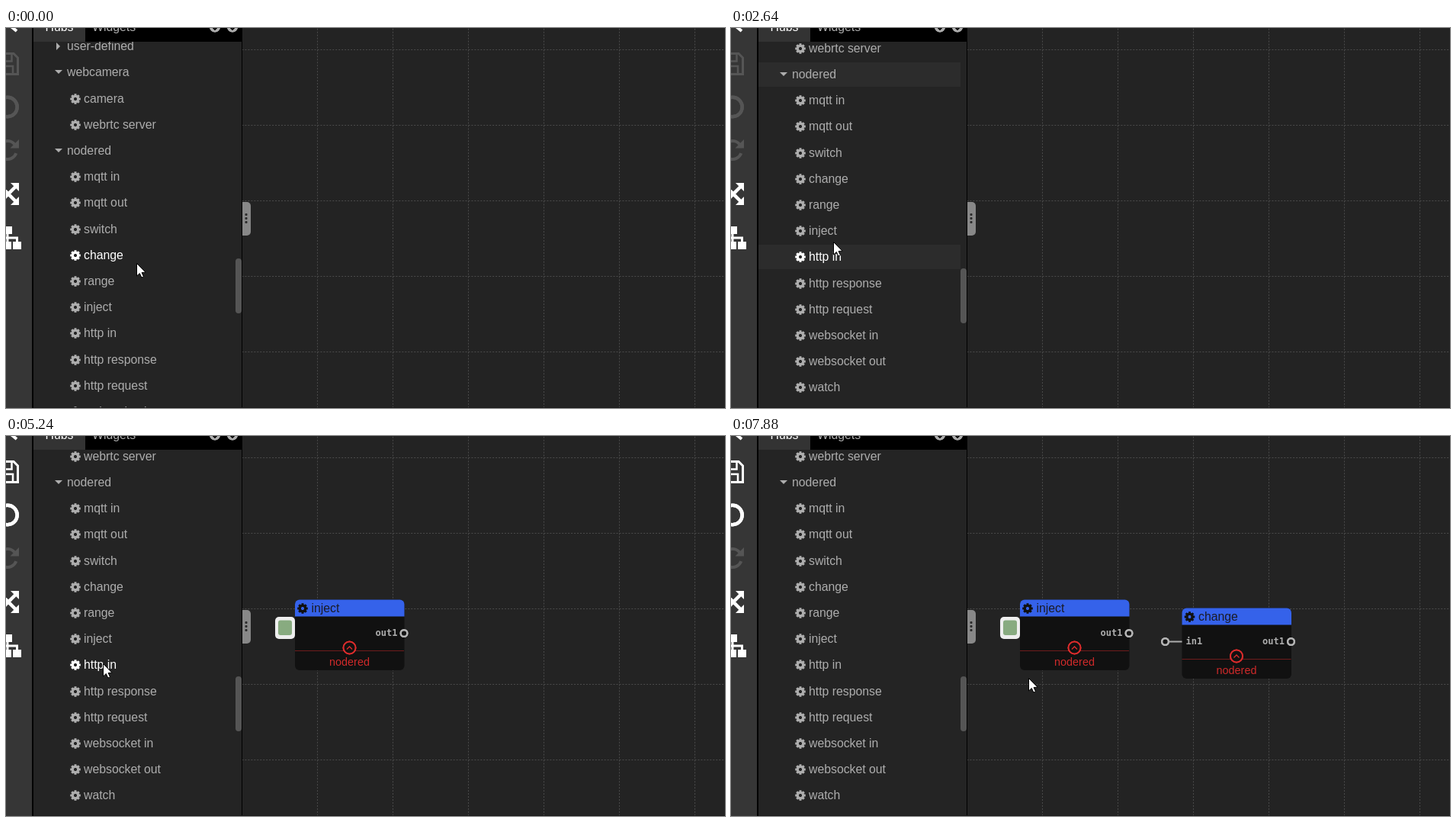
Recreate the animation shown at these times as an HTML page with a canvas. Size 943 by 498 pixels, loop 8000 ms.

```html
<!DOCTYPE html>
<html lang="en">
<head>
<meta charset="utf-8">
<title>Flow editor</title>
<style>
  html, body { margin: 0; width: 100%; height: 100%; overflow: hidden; background: #232323; }
  canvas { display: block; }
</style>
</head>
<body>
<canvas id="stage" width="943" height="498"></canvas>
<script>
const W = 943, H = 498, LOOP = 8000, TICK = 131;
const c = document.getElementById('stage').getContext('2d');
const SANS = '"Liberation Sans", Arial, sans-serif';
const MONO = '"DejaVu Sans Mono", monospace';
const GREY = '#adadad', DIM = '#555', RED = '#dc2c2c';
const ROW = 34.2, FIRST_ROW = 24.15, CELL = 99;
const INJECT_DRAG = 3280, INJECT_DROP = 3680, INJECT_READY = 5240;
const CHANGE_DRAG = 5870, CHANGE_DROP = 7350, CHANGE_READY = 7740;

const groups = ['user-defined', 'webcamera', 'nodered'];
const items = ['user-defined', 'webcamera', 'camera', 'webrtc server', 'nodered',
  'mqtt in', 'mqtt out', 'switch', 'change', 'range', 'inject', 'http in',
  'http response', 'http request', 'websocket in', 'websocket out', 'watch'];

// pointer moves: start, end, destination
const moves = [
  [0, 540, 160, 180], [540, 1120, 143, 342], [1140, 1530, 153, 348],
  [1660, 2360, 140, 314], [2500, 2640, 134, 280], [2640, 2910, 134, 272],
  [3150, INJECT_DROP, 380, 217], [4080, INJECT_READY, 127, 298],
  [5240, 5480, 130, 204], [5740, 6820, 560, 268], [6820, 7090, 608, 252],
  [7090, CHANGE_DROP, 593, 228], [CHANGE_DROP, 7880, 390, 317]];

// progress from 0 to 1, advancing once per screen update
function stepped(t, start, end) {
  const n = Math.max(1, Math.round((end - start) / TICK));
  const k = Math.floor((t - start) / (end - start) * n) / n;
  return Math.max(0, Math.min(1, k));
}

function pointerAt(t) {
  let x = 171, y = 308;
  for (const [start, end, toX, toY] of moves) {
    const k = stepped(t, start, end);
    x += (toX - x) * k;
    y += (toY - y) * k;
  }
  return [x, y];
}

function scrollAt(t) {
  const k = stepped(t, 1660, 2080);
  return 100 * k * k * (3 - 2 * k);
}

const rowY = (i, scroll) => FIRST_ROW + ROW * i - scroll;

function hovered(t) {
  if ((t >= INJECT_DRAG && t < INJECT_READY) || t >= CHANGE_DRAG) return -1;
  const seen = Math.max(0, t - 20);
  const y = pointerAt(seen)[1];
  return items.findIndex((_, i) => Math.abs(y - rowY(i, scrollAt(seen))) < 16);
}

function rect(x, y, w, h, fill) {
  c.fillStyle = fill;
  c.fillRect(x, y, w, h);
}

function round(x, y, w, h, r, fill) {
  c.beginPath();
  c.roundRect(x, y, w, h, r);
  c.fillStyle = fill;
  c.fill();
}

function poly(points, fill) {
  c.beginPath();
  points.forEach(([x, y]) => c.lineTo(x, y));
  c.closePath();
  c.fillStyle = fill;
  c.fill();
}

function stroke(color, width) {
  c.strokeStyle = color;
  c.lineWidth = width;
  c.stroke();
}

function line(points, color, width = 1) {
  c.beginPath();
  points.forEach(([x, y]) => c.lineTo(x, y));
  stroke(color, width);
}

function arc(x, y, r, from, to, color, width) {
  c.beginPath();
  c.arc(x, y, r, from, to);
  stroke(color, width);
}

function ring(x, y, r, color, width, fill = 'transparent') {
  arc(x, y, r, 0, Math.PI * 2, color, width);
  c.fillStyle = fill;
  c.fill();
  stroke(color, width);
}

function text(s, x, y, color, align = 'left', font = '15.8px ' + SANS) {
  c.font = font;
  c.textAlign = align;
  c.fillStyle = color;
  c.fillText(s, x, y);
}

function gear(x, y, color) {
  c.save();
  c.translate(x, y);
  ring(0, 0, 3.7, color, 3);
  c.fillStyle = color;
  for (let i = 0; i < 8; i++) {
    c.rotate(Math.PI / 4);
    c.fillRect(-1.5, -6.8, 3, 2.6);
  }
  c.restore();
}

function drawGrid() {
  const left = 309.5, top = 28.5 - CELL;
  c.setLineDash([CELL / 50, CELL / 50]);
  for (let x = left + CELL; x < W; x += CELL) line([[x, top], [x, H]], '#4b4b4b');
  for (let y = top + CELL; y < H; y += CELL) line([[left, y], [W, y]], '#4b4b4b');
  c.setLineDash([]);
}

function drawToolbar(edited) {
  const on = edited ? '#fff' : DIM;
  rect(0, 0, 34, H, '#363636');
  rect(34, 0, 2, H, '#000');
  line([[3, -5], [14, 4]], '#fff', 4);

  // save
  line([[-4, 33.5], [10, 33.5], [15.5, 39], [15.5, 60.5], [-4, 60.5]], on, 3);
  line([[-4, 43.5], [7.5, 43.5], [7.5, 34]], on, 2.5);
  line([[-4, 50], [9, 50], [9, 60]], on, 2.5);

  ring(2, 103.5, 12.7, on, 4.5);

  // redo
  arc(2, 160, 12, 0.35, 2, DIM, 4);
  arc(2, 160, 12, -1.8, -0.6, DIM, 4);
  poly([[17, 146], [17, 157.5], [5.5, 157.5]], DIM);

  // expand, mirrored about its middle
  for (const s of [-1, 1]) {
    line([[-6, 217.5 - 9 * s], [13, 217.5 + 10 * s]], '#fff', 4.5);
    poly([[6, 217.5 + 14.5 * s], [17, 217.5 + 14.5 * s], [17, 217.5 + 3.5 * s]], '#fff');
  }

  // tree
  rect(-4, 260, 12, 10, '#fff');
  rect(0.5, 269, 3, 12, '#fff');
  rect(-4, 273.5, 20, 3, '#fff');
  rect(13, 274, 3, 7, '#fff');
  rect(-4, 280, 11, 10, '#fff');
  rect(9, 280, 11, 10, '#fff');
}

function drawRow(name, y, open, lit) {
  const color = lit ? '#fff' : GREY;
  if (groups.includes(name)) {
    if (open) poly([[64, y - 3], [74, y - 3], [69, y + 2]], GREY);
    else poly([[66, y - 5], [71, y], [66, y + 5]], GREY);
    text(name, 80, y + 5, GREY);
  } else {
    gear(91, y, color);
    text(name, 102, y + 5, color);
  }
}

function drawPanel(t) {
  const scroll = scrollAt(t), hover = hovered(t);
  rect(36, 0, 273, H, '#242424');
  c.save();
  c.beginPath();
  c.rect(36, 18, 273, H - 18);
  c.clip();
  items.forEach((name, i) => {
    const y = Math.round(rowY(i, scroll)), lit = i === hover;
    const held = name === 'nodered' && t >= 2080 && t < INJECT_READY;
    if (held || (lit && t > 1000 && t < INJECT_DRAG)) rect(36, y - 16, 265, 32, '#2c2c2c');
    drawRow(name, y, i > 0, lit);
  });
  c.restore();
  round(301, 302 + scroll * 0.13, 8, 72, 4, DIM);

  rect(36, 0, 68, 18, '#333');
  rect(104, 0, 206, 18, '#000');
  text('Hubs', 51.5, 4, '#fff');
  text('Widgets', 113, 4, GREY);
  for (const x of [274, 297]) {
    ring(x, -1.5, 3.5, GREY, 7);
    line([[x - 3, -1], [x, 2], [x + 3, -1]], '#000', 1.8);
  }
  rect(309, 0, 1, H, '#000');
}

function drawHandle() {
  round(310, 228, 11, 44, [0, 5, 5, 0], '#888');
  for (let y = 243; y < 256; y += 5) round(313.5, y, 3, 3, 1, '#2b2b2b');
}

function port(x, y) {
  ring(x, y, 4.3, '#b5b5b5', 2.4, '#151515');
}

function drawNode(name, x, y, hasInput) {
  const label = 'bold 12px ' + MONO, mid = x + 71.5, portY = y + 44;
  if (!hasInput) {
    round(x - 26, y + 22.5, 26, 29, 5, '#eee');
    round(x - 22, y + 27, 18, 19.5, 3, '#88ab80');
  }
  round(x, y, 143.5, 92.5, 6, '#111');
  round(x, y, 143.5, 22, [6, 6, 0, 0], '#3562ea');
  gear(x + 10, y + 11.5, '#111');
  text(name, x + 21.5, y + 16.5, '#1b1b26');
  if (hasInput) {
    line([[x - 18, portY], [x, portY]], GREY, 2);
    port(x - 22, portY);
    text('in1', x + 5, y + 47.5, GREY, 'left', label);
  }
  text('out1', x + 134.5, y + 47.5, GREY, 'right', label);
  port(x + 143, portY);
  line([[x, y + 67], [x + 143, y + 67]], '#6e1c1c');
  ring(mid, y + 63, 8, RED, 2, '#111');
  line([[mid - 3.5, y + 65], [mid, y + 61.5], [mid + 3.5, y + 65]], RED, 1.3);
  text('nodered', mid, y + 86.5, '#cf2a2a', 'center', '14.4px ' + SANS);
}

// outline that follows the pointer until it is dropped
function drawGhost(name, t, drop, grip) {
  const [px, py] = pointerAt(Math.min(t, drop));
  const x = Math.round(px) - 1, y = Math.round(py) + (t < drop ? grip : -4);
  if (x < 290) return;
  c.beginPath();
  c.roundRect(x + 0.5, y + 0.5, 142, 65, 6);
  stroke(GREY, 1);
  text(name, x + 71.5, y + 17, GREY, 'center');
}

function drawPointer([x, y]) {
  c.save();
  c.translate(Math.round(x) + 0.5, Math.round(y) + 0.5);
  poly([[0, 0], [0, 16.5], [3.8, 13], [6.3, 18.5], [9, 17.4], [6.6, 12], [11.5, 11.7]], '#fff');
  stroke('#000', 1);
  c.restore();
}

function draw(t) {
  rect(0, 0, W, H, '#232323');
  drawGrid();
  drawToolbar(t >= INJECT_READY);
  drawPanel(t);
  drawHandle();
  rect(36, 497, W - 36, 1, '#1a1a1a');
  if (t >= INJECT_READY) drawNode('inject', 379, 214.5, false);
  else if (t >= INJECT_DRAG) drawGhost('inject', t, INJECT_DROP, -4);
  if (t >= CHANGE_READY) drawNode('change', 591.5, 225.5, true);
  else if (t >= CHANGE_DRAG) drawGhost('change', t, CHANGE_DROP, 13);
  drawPointer(pointerAt(t));
}

function tick() {
  draw(performance.now() % LOOP);
  requestAnimationFrame(tick);
}
tick();
</script>
</body>
</html>
```
